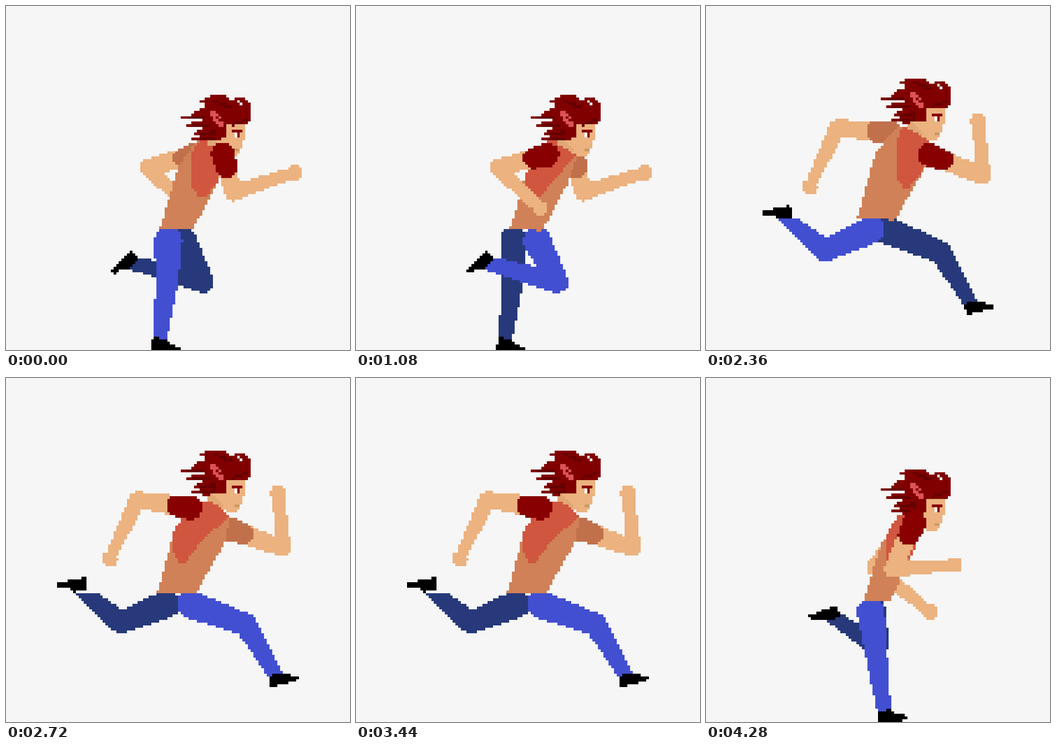
These frames come from a looping animation (748 by 748 pixels, 4.32 s). An HTML page with a canvas:

```html
<!DOCTYPE html>
<html lang="en">
<head>
<meta charset="utf-8">
<title>Runner</title>
<style>
html, body { margin: 0; width: 100%; height: 100%; overflow: hidden; background: #f6f6f6; }
canvas { display: block; width: 100vw; height: 100vh; image-rendering: pixelated; }
</style>
</head>
<body>
<canvas id="stage" width="128" height="128"></canvas>
<script>
const ctx = document.getElementById('stage').getContext('2d');
const GRID = 128, UNIT = 748 / GRID, STEP = 40, CYCLE = 18, HALF = CYCLE / 2;
const C = {
  bg: '#f6f6f6', skin: '#ecb27f', shade: '#dfa876', mouth: '#c99a66', eye: '#ffffff',
  hair: '#800000', hairDark: '#650000', sleeve: '#880000', clip: '#dd5355',
  shirt: '#d08157', panel: '#d0563f', farSleeve: '#c0714c',
  jeans: '#424fd1', farJeans: '#27397a', shoe: '#000000'
};

// phase: hip x, knee, ankle
const LEG = {
  0: [353, 350, 600, 335, 724],
  4: [358, 274, 560, 150, 531],
  5: [358, 260, 532, 172, 460],
  8: [372, 383, 582, 288, 522],
  9: [394, 438, 600, 288, 560],
  13: [390, 506, 510, 524, 630],
  15: [408, 512, 575, 604, 664],
  17: [358, 370, 600, 388, 724]
};

// phase: elbow, hand
const ARM = {
  0: [494, 406, 626, 362],
  4: [620, 333, 558, 257],
  5: [602, 370, 592, 250],
  8: [366, 412, 487, 508],
  9: [308, 352, 400, 440],
  13: [315, 226, 222, 293],
  14: [285, 265, 226, 393],
  17: [405, 416, 541, 406]
};

const wave = (phase, peak, period = CYCLE) => Math.cos(2 * Math.PI * (phase - peak) / period);
const beltAt = p => 475 + 11 * wave(p, -0.3, HALF) + 3 * wave(p, 13);

// slow rise through the stride, quick drop on landing
function browAt(phase) {
  const u = (phase + 1) % HALF;
  return Math.round(47 - 1.15 * Math.min(u, 3.5 * (HALF - u)));
}

// periodic cubic through the key poses
function pose(keys, phase) {
  const times = Object.keys(keys).map(Number), n = times.length;
  const p = phase % CYCLE;
  let i = n - 1;
  while (times[i] > p) i--;
  const at = k => {
    const j = (k + n) % n;
    return { t: times[j] + CYCLE * Math.floor(k / n), v: keys[times[j]] };
  };
  const [a, b, c, d] = [at(i - 1), at(i), at(i + 1), at(i + 2)];
  const span = c.t - b.t, s = (p - b.t) / span;
  return b.v.map((v, k) => {
    const m0 = (c.v[k] - a.v[k]) / (c.t - a.t) * span;
    const m1 = (d.v[k] - v) / (d.t - b.t) * span;
    const delta = c.v[k] - v;
    return v + s * (m0 + s * (3 * delta - 2 * m0 - m1 + s * (m0 + m1 - 2 * delta)));
  });
}

const polygon = (points, dy = 0) => (x, y) => {
  let hit = false;
  points.forEach(([x1, y1], i) => {
    const [x0, y0] = points.at(i - 1);
    const u = (y - dy - y0) / (y1 - y0);
    if (y0 + dy > y !== y1 + dy > y && x < x0 + (x1 - x0) * u) hit = !hit;
  });
  return hit;
};

const bone = (x0, y0, r0, x1, y1, r1) => {
  const dx = x1 - x0, dy = y1 - y0, len2 = dx * dx + dy * dy || 1;
  return (x, y) => {
    const s = Math.max(0, Math.min(1, ((x - x0) * dx + (y - y0) * dy) / len2));
    return Math.hypot(x - x0 - s * dx, y - y0 - s * dy) < r0 + (r1 - r0) * s;
  };
};

// fills every cell whose centre lies inside the shape
function paint(color, inside, top = 0) {
  ctx.fillStyle = color;
  for (let y = Math.round(top / UNIT); y < GRID; y++)
    for (let x = 0; x < GRID; x++)
      if (inside((x + 0.5) * UNIT, (y + 0.5) * UNIT)) ctx.fillRect(x, y, 1, 1);
}

function leg(phase, color, shift, belt) {
  const [hx, kx, ky, ax, ay] = pose(LEG, phase).map((v, i) => i % 2 && i > 1 || !i || i === 1 ? v + shift : v);
  const shin = (Math.atan2(ay - ky, ax - kx) + 2 * Math.PI) % (2 * Math.PI) - Math.PI / 2;
  const turn = shin * (shin > 0 ? 1.3 : 0.5);
  const cos = Math.cos(turn), sin = Math.sin(turn);
  const shoe = [[-16, -2], [14, -2], [21, 6], [46, 13], [48, 24], [-16, 24]]
    .map(([x, y]) => [ax + x * cos - y * sin, ay + x * sin + y * cos]);
  paint(color, bone(hx, belt + 24, 30, kx, ky, 24), belt);
  paint(color, bone(kx, ky, 24, ax, ay, 15), belt);
  paint(C.shoe, polygon(shoe));
}

function arm(phase, sleeve, belt) {
  const [ex, ey, hx, hy] = pose(ARM, phase);
  const sx = 444 + 56 * wave(phase, 3), sy = belt - 163 + 24 * wave(phase, 4.5);
  const reach = 30 / Math.hypot(ex - sx, ey - sy);
  paint(C.skin, bone(sx, sy, 23, ex, ey, 18));
  paint(C.skin, bone(ex, ey, 18, hx, hy, 12));
  paint(C.skin, bone(hx, hy, 17, hx, hy, 17));
  paint(sleeve, bone(sx, sy, 26, sx + (ex - sx) * reach, sy + (ey - sy) * reach, 23));
}

function torso(phase, belt) {
  const open = Math.abs(wave(phase, 3));
  const chest = 42 + 22 * open, waist = 24 + 21 * open;
  const body = polygon([
    [418, -185 - 20 * open], [428 - chest, -120 - 35 * open],
    [369 - waist, 0], [371 + waist, 2],
    [436 + 52 * open, -90 - 26 * open], [428 + chest, -165], [455, -185 - 20 * open]
  ], belt);
  const tip = 400 + 34 * wave(phase, 3);
  const panel = polygon([
    [428, -210], [tip - 12, -165], [tip - 14, -95], [tip + 2, -68],
    [tip + 16, -68], [tip + 45, -105], [485, -170], [450, -210]
  ], belt);
  paint(C.shirt, body);
  paint(C.panel, (x, y) => body(x, y) && panel(x, y));
}

function hair(phase, dy) {
  const flutter = dy + 4 * wave(phase, 0, 3);
  const tips = [[383, -31], [394, -14], [410, 4], [406, 19], [412, -44], [422, -66], [436, -71]];
  for (const [x, y] of tips) paint(C.hair, bone(x, y + flutter, 3, 465, y * 0.8 - 8 + flutter, 10));
  paint(C.hair, polygon([
    [436, -72], [473, -76], [492, -62], [498, -70], [520, -70], [531, -54], [531, -18],
    [520, -12], [479, -12], [479, 18], [468, 18], [468, 0], [456, 0], [442, 24], [425, 24], [428, -10]
  ], dy));
  for (const [x, y] of tips.slice(0, 4)) {
    paint(C.hairDark, bone(x + 12, y + flutter, 2, x + 45, y * 0.85 - 2 + flutter, 4));
  }
  paint(C.hairDark, bone(452, -66 + flutter, 3, 487, -52 + flutter, 4));
  paint(C.hairDark, bone(494, -14 + flutter, 3, 522, -24 + flutter, 3));
  paint(C.clip, bone(449, -40 + flutter, 7, 467, -17 + flutter, 7));
  for (let i = 0; i < 4; i++) {
    const x = 450 + 6 * i, y = -37 + 7 * i + flutter;
    paint(C.hair, bone(x, y, 3, x, y, 3));
  }
}

function head(phase, brow) {
  const dy = brow * UNIT;
  const bar = (color, x, y, w, h = 1) => {
    ctx.fillStyle = color;
    ctx.fillRect(x, brow + y, w, h);
  };
  const face = polygon([
    [466, -12], [520, -12], [520, 17], [514, 34], [508, 46], [502, 57],
    [479, 57], [456, 41], [438, 34], [438, 22], [452, 0]
  ], dy);
  const jaw = bone(442, 26 + dy, 9, 464, 46 + dy, 7);
  paint(C.skin, face);
  paint(C.shade, (x, y) => face(x, y) && jaw(x, y));
  bar(C.mouth, 85, 7, 2);
  hair(phase, dy);
  bar(C.bg, 86, -11, 1);
  bar(C.bg, 87, -10, 1);
  bar(C.sleeve, 84, 0, 4);
  bar(C.eye, 85, 1, 1, 2);
  bar(C.sleeve, 86, 1, 1, 2);
}

function draw(phase) {
  const belt = beltAt(phase), brow = browAt(phase), neck = brow * UNIT;
  ctx.fillStyle = C.bg;
  ctx.fillRect(0, 0, GRID, GRID);
  arm(phase + HALF, C.farSleeve, belt);
  leg(phase + HALF, C.farJeans, -10, belt);
  leg(phase, C.jeans, 0, belt);
  paint(C.shade, bone(450, 30 + neck, 12, 456, 50 + neck, 12));
  torso(phase, belt);
  head(phase, brow);
  arm(phase, C.sleeve, belt);
}

const start = performance.now();
let shown = -1;
function tick() {
  const phase = Math.floor((performance.now() - start) / STEP) % CYCLE;
  if (phase !== shown) draw(shown = phase);
  requestAnimationFrame(tick);
}
tick();
</script>
</body>
</html>
```
